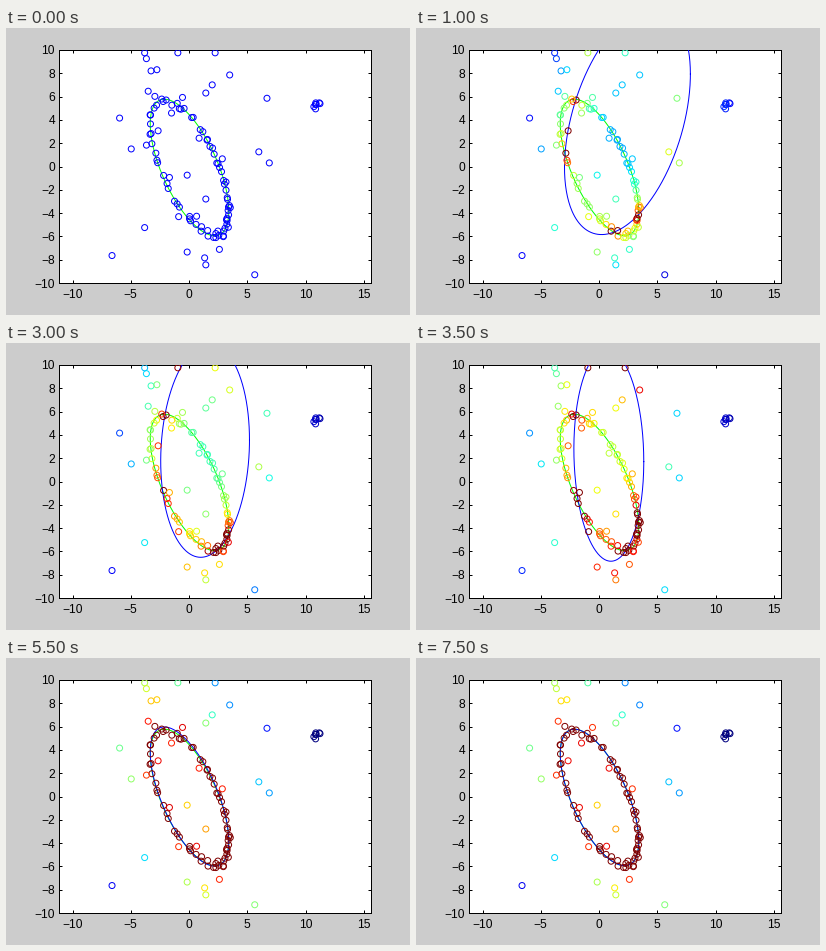
Recreate the animation shown at these times as a matplotlib script. Size 404x287 px, loop 8 s.

```python
import numpy as np
import matplotlib.pyplot as plt
from matplotlib.animation import FuncAnimation
from matplotlib.transforms import Affine2D

W, H, DPI = 404, 287, 100
PX = 72 / DPI                      # one pixel in points
LEFT, RIGHT, TOP, BOTTOM = 53, 365, 22, 255
UNIT = (BOTTOM - TOP) / 20         # pixels per data unit
X0 = 183                           # column of x = 0
STEPS, INTERVAL = 16, 500
BLUE, GREEN = "#0000ff", "#00ff00"

plt.rcParams["font.family"] = "Liberation Sans"

# Fit state: centre x, half width, bottom, top, correlation, colour level
START = np.array([2.43, 5.45, -5.78, 14.2, 0.42, 0.28])
TURN = np.array([0.8, 3.0, -6.8, 11.4, -0.06, 0.58])
END = np.array([0, 3.37, -5.9, 5.82, -0.64, 0.68])
POWER = np.array([2.2, 2.2, 2.2, 1, 2.2, 4])
DECAY = np.array([0.8, 0.8, 0.21, 0.21, 0.8, 0.8])
TURN_STEP = 7


def fit_at(step):
    """Ease slowly away from the first fit, then settle on the true shape."""
    if step <= TURN_STEP:
        t = (step - 1) / (TURN_STEP - 1)
        return START + (TURN - START) * t ** POWER
    return END + (TURN - END) * np.exp(-DECAY * (step - TURN_STEP) ** 2)


def ellipse(t, cx, a, bottom, top, rho, grow=1):
    cy, b = (top + bottom) / 2, (top - bottom) / 2
    return cx + grow * a * np.cos(t), cy + grow * b * np.sin(t + np.arcsin(rho))


def residual(x, y, cx, a, bottom, top, rho):
    u, v = (x - cx) / a, (2 * y - top - bottom) / (top - bottom)
    return np.abs((u * u + v * v - 2 * rho * u * v) / (1 - rho * rho) - 1)


def samples():
    rng = np.random.default_rng(7)
    truth = END[:5]
    # close samples, denser towards the lower right
    u = np.linspace(0, 2 * np.pi, 72, endpoint=False)
    t = u - 0.35 * np.sin(u) + rng.normal(0, 0.06, u.size)
    near = ellipse(t, *truth, grow=1 + rng.normal(0, 0.035, u.size))
    # looser samples around the same curve
    t = np.linspace(0.8, 5.4, 11)
    loose = ellipse(t, *truth, grow=1 + 0.2 * (-1) ** np.arange(t.size))
    cluster = rng.normal([10.95, 5.5], [0.2, 0.4], (7, 2)).T
    stray = np.transpose([
        (-3.85, 9.8), (-3.7, 9.3), (-1, 9.8), (2.2, 9.8), (-3.3, 8.25),
        (-2.8, 8.35), (3.45, 7.9), (1.95, 7.05), (1.4, 6.35), (6.65, 5.9),
        (-6, 4.2), (-5, 1.55), (5.95, 1.3), (6.85, 0.35), (-0.2, -0.7),
        (1.4, -2.75), (-3.85, -5.2), (-0.2, -7.3), (1.3, -7.8),
        (1.4, -8.4), (-6.65, -7.6), (5.6, -9.25),
    ])
    return np.hstack([near, loose, cluster, stray])


px, py = samples()

fig = plt.figure(figsize=(W / DPI, H / DPI), dpi=DPI, facecolor="#cccccc")
ax = fig.add_axes([LEFT / W, 1 - BOTTOM / H, (RIGHT - LEFT) / W, (BOTTOM - TOP) / H])
ax.set_xlim((LEFT - X0) / UNIT, (RIGHT - X0) / UNIT)
ax.set_ylim(-10, 10)
ax.set_xticks(range(-10, 16, 5))
ax.set_yticks(range(-10, 11, 2))
ax.tick_params(direction="in", top=True, right=True, length=3 * PX,
               width=PX, pad=4 * PX, labelsize=12 * PX)
ax.tick_params(axis="x", pad=6 * PX)
for spine in ax.spines.values():
    spine.set_linewidth(PX)

# Put curves and dots on pixel centres, like the snapped frame
centred = ax.transData + Affine2D().translate(0.5, -0.5)
turn = np.linspace(0, 2 * np.pi, 300)
ax.plot(*ellipse(turn, *END[:5]), color=GREEN, lw=PX, transform=centred, zorder=2)
curve, = ax.plot([], [], color=BLUE, lw=PX, transform=centred, zorder=3)
dots = ax.scatter(px, py, s=(6 * PX) ** 2, facecolors="none", edgecolors=BLUE,
                  linewidths=PX, transform=centred, zorder=4)


def update(step):
    if step == 0:
        curve.set_data([], [])
        dots.set_edgecolor(BLUE)
    else:
        *shape, level = fit_at(step)
        curve.set_data(*ellipse(turn, *shape))
        gap = np.maximum(residual(px, py, *shape), 1e-3)
        dots.set_edgecolor(plt.cm.jet(np.clip(level - 0.22 * np.log(gap), 0, 1)))
    return curve, dots


anim = FuncAnimation(fig, update, frames=STEPS, interval=INTERVAL,
                     repeat=True, repeat_delay=0)
plt.show()
```
